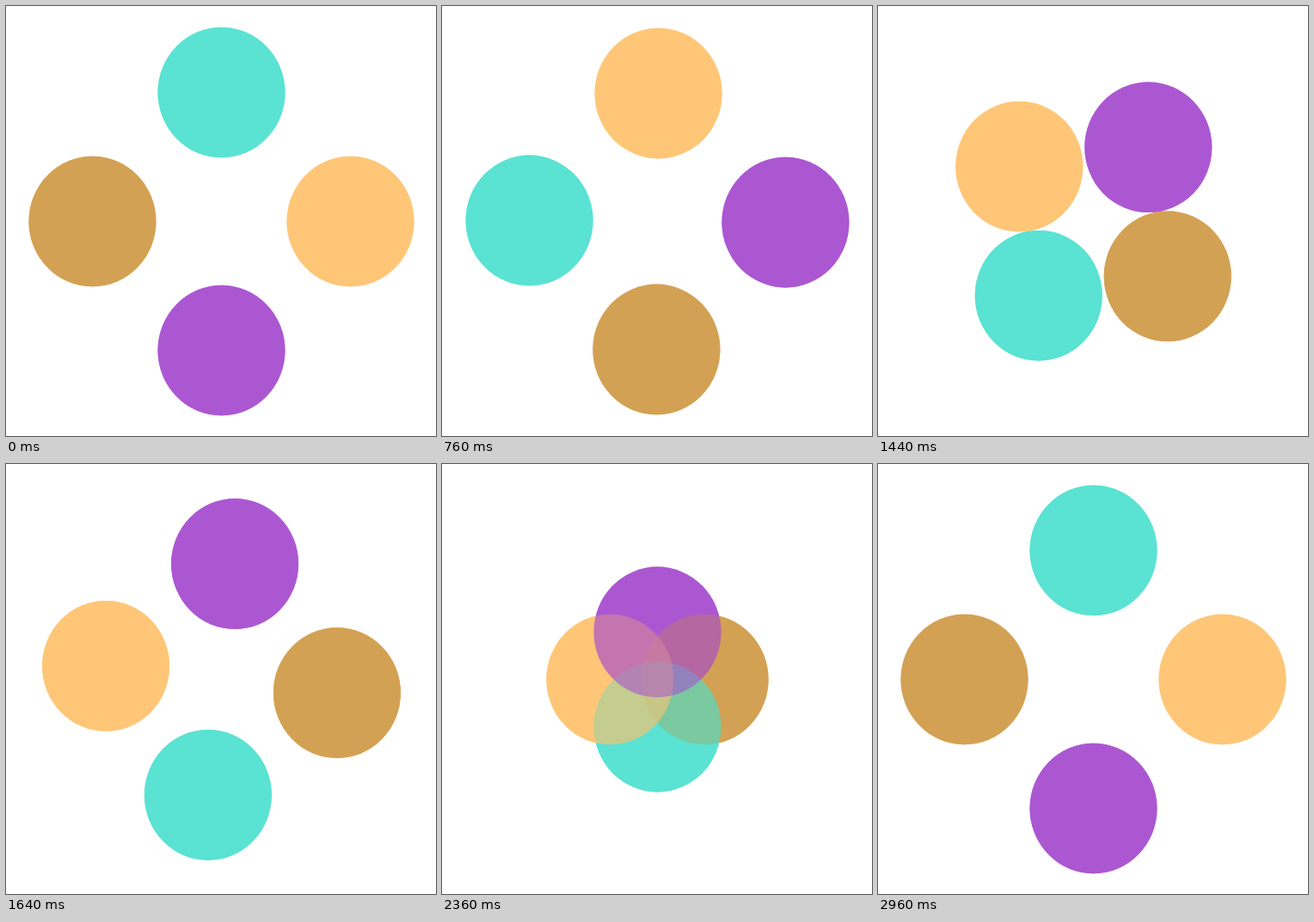
Write an HTML page with a canvas that moves like this. It is 500 px wide and 500 px high and loops after 3 s.

```html
<!DOCTYPE html>
<html lang="en">
<head>
<meta charset="utf-8">
<title>Four circles</title>
<style>
  html, body { margin: 0; width: 100%; height: 100%; overflow: hidden; background: #fff; }
  canvas { display: block; }
</style>
</head>
<body>
<canvas id="stage" width="500" height="500"></canvas>
<script>
const canvas = document.getElementById("stage");
const ctx = canvas.getContext("2d");
const LOOP = 3000, STEP = 40;
const CENTER = 250.5, REACH = 150, RX = 74, RY = 75.8;

// Corners of the diamond, counterclockwise from the top
const corners = [[0, -1], [-1, 0], [0, 1], [1, 0]];

// Back to front, each with its starting corner
const circles = [
  { color: "rgb(210,155,74)", start: 1 },
  { color: "rgb(80,226,208)", start: 0 },
  { color: "rgb(255,196,112)", start: 3 },
  { color: "rgb(167,79,208)", start: 2 }
];

// Two quarter turns, then a swap across the middle
const moves = [
  { turn: 1, duration: 800 },
  { turn: 1, duration: 800 },
  { turn: 2, duration: 960 }
];

const smooth = x => x * x * (3 - 2 * x);

function draw(time) {
  const phase = Math.floor(time / 1000);
  const { turn, duration } = moves[phase];
  const k = smooth(Math.min(1, (time % 1000) / duration));

  ctx.clearRect(0, 0, 500, 500);
  ctx.globalAlpha = 0.5;
  for (const { color, start } of circles) {
    const from = corners[(start + phase) % 4];
    const to = corners[(start + phase + turn) % 4];
    const [x, y] = from.map((v, i) => CENTER + REACH * (v + (to[i] - v) * k));
    ctx.fillStyle = color;
    ctx.beginPath();
    ctx.ellipse(x, y, RX, RY, 0, 0, 2 * Math.PI);
    ctx.fill();
  }
  // Stack the picture on itself: denser, with the same hues
  ctx.globalAlpha = 1;
  for (let i = 0; i < 2; i++) ctx.drawImage(canvas, 0, 0);
}

function tick() {
  const now = performance.now() + 2;
  draw(Math.floor((now % LOOP) / STEP) * STEP);
  requestAnimationFrame(tick);
}
tick();
</script>
</body>
</html>
```
